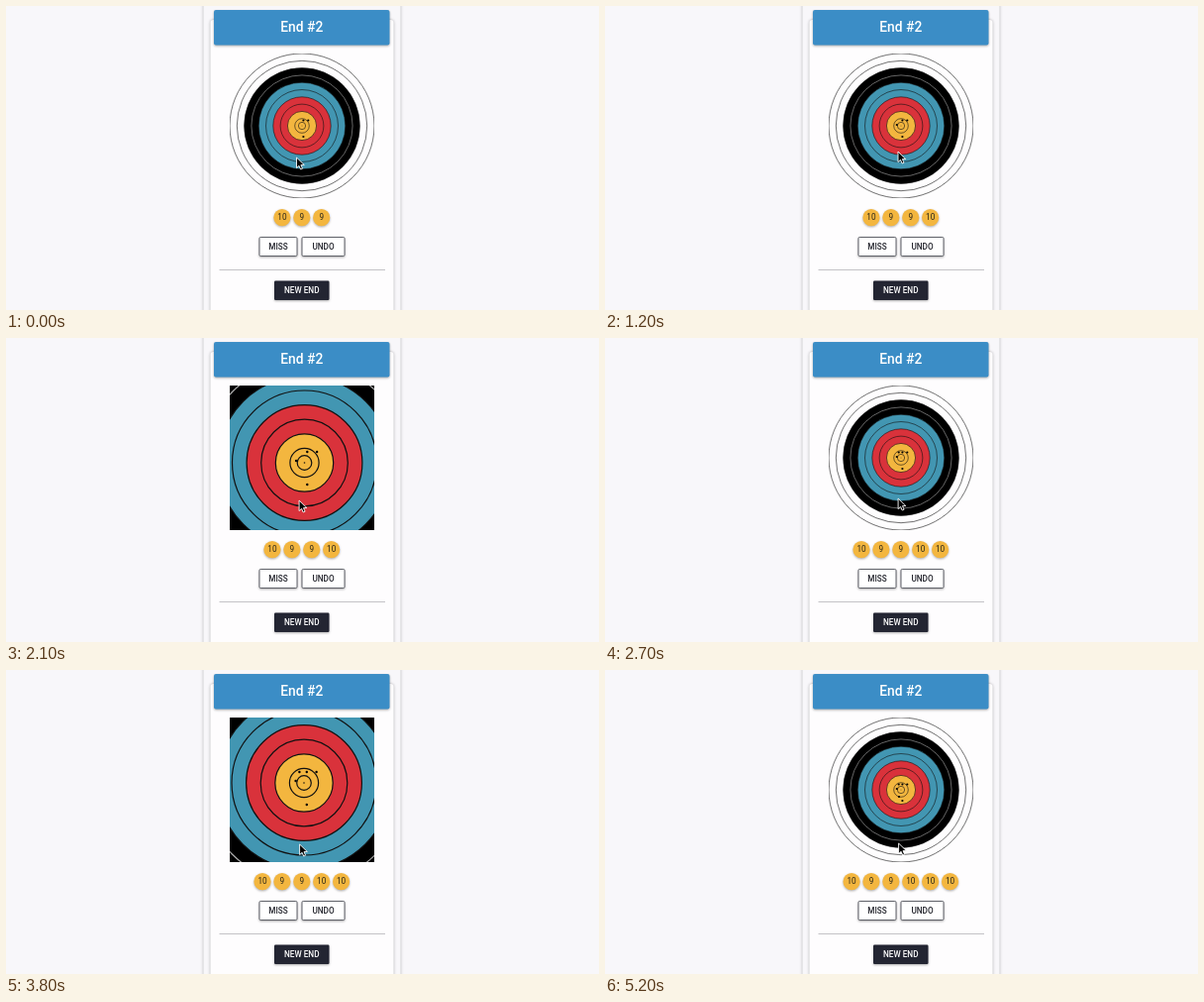
Animation, 599 px wide and 307 px high, one loop 5.3 s. Source, as an HTML page:

```html
<!DOCTYPE html>
<html lang="en">
<head>
<meta charset="utf-8">
<title>Archery score</title>
<style>
  html, body { margin: 0; width: 100%; height: 100%; overflow: hidden; background: #f8f7fa; }
  svg { display: block; }
  text { font-family: Roboto, Arial, sans-serif; text-anchor: middle; }
  .label { font-size: 8.2px; font-weight: 500; fill: #25262e; }
  .light { fill: #fff; }
  .score { font-size: 8.2px; fill: #2b2718; }
  .button { fill: #fff; stroke: #50525a; stroke-width: .9; }
  .soft { filter: drop-shadow(0 1px 1.2px rgba(0, 0, 0, .32)); }
  .card { filter: drop-shadow(0 .5px 1.8px rgba(0, 0, 0, .3)); }
</style>
</head>
<body>
<svg width="599" height="307" viewBox="0 0 599 307">
  <defs>
    <clipPath id="face"><rect x="226" y="48" width="146" height="146"/></clipPath>
  </defs>
  <rect width="599" height="307" fill="#f8f7fa"/>
  <rect class="card" x="199.5" y="-10" width="199" height="330" fill="#f8f7fa"/>
  <rect class="card" x="206.5" y="14" width="185" height="310" rx="3" fill="#fefdfe"/>
  <rect class="soft" x="210" y="4" width="177.5" height="35.5" rx="2" fill="#3b8dc6"/>
  <text class="light" x="298.8" y="26" font-size="13.8" font-weight="500">End #2</text>

  <g clip-path="url(#face)"><g id="target"></g></g>
  <g id="scores"></g>

  <g class="soft">
    <rect class="button" x="256" y="233.5" width="38" height="19" rx="1.2"/>
    <rect class="button" x="299" y="233.5" width="43" height="19" rx="1.2"/>
    <rect x="271" y="277.5" width="55.5" height="19.5" rx="1.2" fill="#232532"/>
  </g>
  <text class="label" x="275" y="246">MISS</text>
  <text class="label" x="320.5" y="246">UNDO</text>
  <text class="label light" x="298.8" y="290.2">NEW END</text>
  <path d="M215.5 266.5H383" stroke="#c3c2c6"/>

  <path id="cursor" d="M0 0V10.6L2.5 8.3L4.1 12L6 11.2L4.4 7.6H7.8Z"
        fill="#000" stroke="#fff" stroke-width=".9" stroke-linejoin="round"/>
</svg>
<script>
const LOOP = 5300, STEP = 100, CX = 299, CY = 121, RING = 7.3, REACH = 48;
const $ = id => document.getElementById(id);

const shots = [
  { x: 1.4, y: -5.5, score: 10 }, { x: 6.3, y: -5.5, score: 9 },
  { x: 1.4, y: 11, score: 9 }, { x: -4.2, y: -1, score: 10 },
  { x: -2.3, y: -5.5, score: 10 }, { x: -2, y: 7, score: 10 }
];
// press and release times of the three aimed shots
const presses = [[100, 500], [1500, 2300], [3300, 4100]];
// cursor tip: time, x, y
const path = [
  [0, 293.5, 153], [300, 294.6, 168], [600, 294.6, 168], [1100, 296, 147],
  [1500, 296, 147], [1900, 296.1, 164], [2300, 296.1, 164], [2400, 296.1, 162],
  [3300, 296.1, 162], [3700, 296.6, 176], [4100, 296.6, 176], [4300, 296.6, 175],
  [LOOP, 296.6, 175]
];

const circle = (x, y, r, fill, stroke = "none") =>
  `<circle cx="${x}" cy="${y}" r="${r}" fill="${fill}" stroke="${stroke}" stroke-width=".6"/>`;

function face() {
  const fills = ["#fefdfe", "#000", "#4296b2", "#d9323b", "#f3b63f"];
  let out = "";
  for (let i = 0; i < 10; i++)
    out += circle(0, 0, RING * (10 - i), fills[i >> 1], i === 3 ? "#aaa" : "#111");
  return out + circle(0, 0, RING / 2, "none", "#111") + circle(0, 0, .4, "#111");
}

const badges = n => shots.slice(0, n).map((s, i) => {
  const x = 298.8 + (i - (n - 1) / 2) * 19.9;
  return `<g class="soft">${circle(x, 213.7, 8.6, "#f3b63f")}</g>
    <text class="score" x="${x}" y="216.3">${s.score}</text>`;
}).join("");

function cursorAt(t) {
  const i = path.findIndex(p => p[0] > t);
  const a = path[i - 1], b = path[i];
  const u = (t - a[0]) / (b[0] - a[0]), k = u * u * (3 - 2 * u);
  return [a[1] + (b[1] - a[1]) * k, a[2] + (b[2] - a[2]) * k];
}

$("target").innerHTML = face() + shots.map(s => circle(s.x, s.y, 1, "#000")).join("");
const dots = [...$("target").children].slice(-shots.length);
let shown = 0;

function draw(now) {
  const t = Math.floor(now % LOOP / STEP) * STEP;
  const [x, y] = cursorAt(t);
  const zoom = presses.some(([a, b]) => t >= a && t < b);
  const count = 3 + presses.filter(p => t >= p[1]).length;

  // zooming keeps the aim point, above the cursor, in place
  const tx = zoom ? 2 * CX - x - .4 : CX;
  const ty = zoom ? 2 * CY - y + REACH : CY;
  $("target").setAttribute("transform", `translate(${tx} ${ty}) scale(${zoom ? 2 : 1})`);
  $("cursor").setAttribute("transform", `translate(${x} ${y})`);
  dots.forEach((d, i) => {
    d.setAttribute("r", zoom ? .6 : 1.1);
    d.setAttribute("visibility", i < count ? "visible" : "hidden");
  });
  if (count !== shown) $("scores").innerHTML = badges(shown = count);
}

const start = performance.now();
(function tick() {
  draw(performance.now() - start);
  requestAnimationFrame(tick);
})();
</script>
</body>
</html>
```
